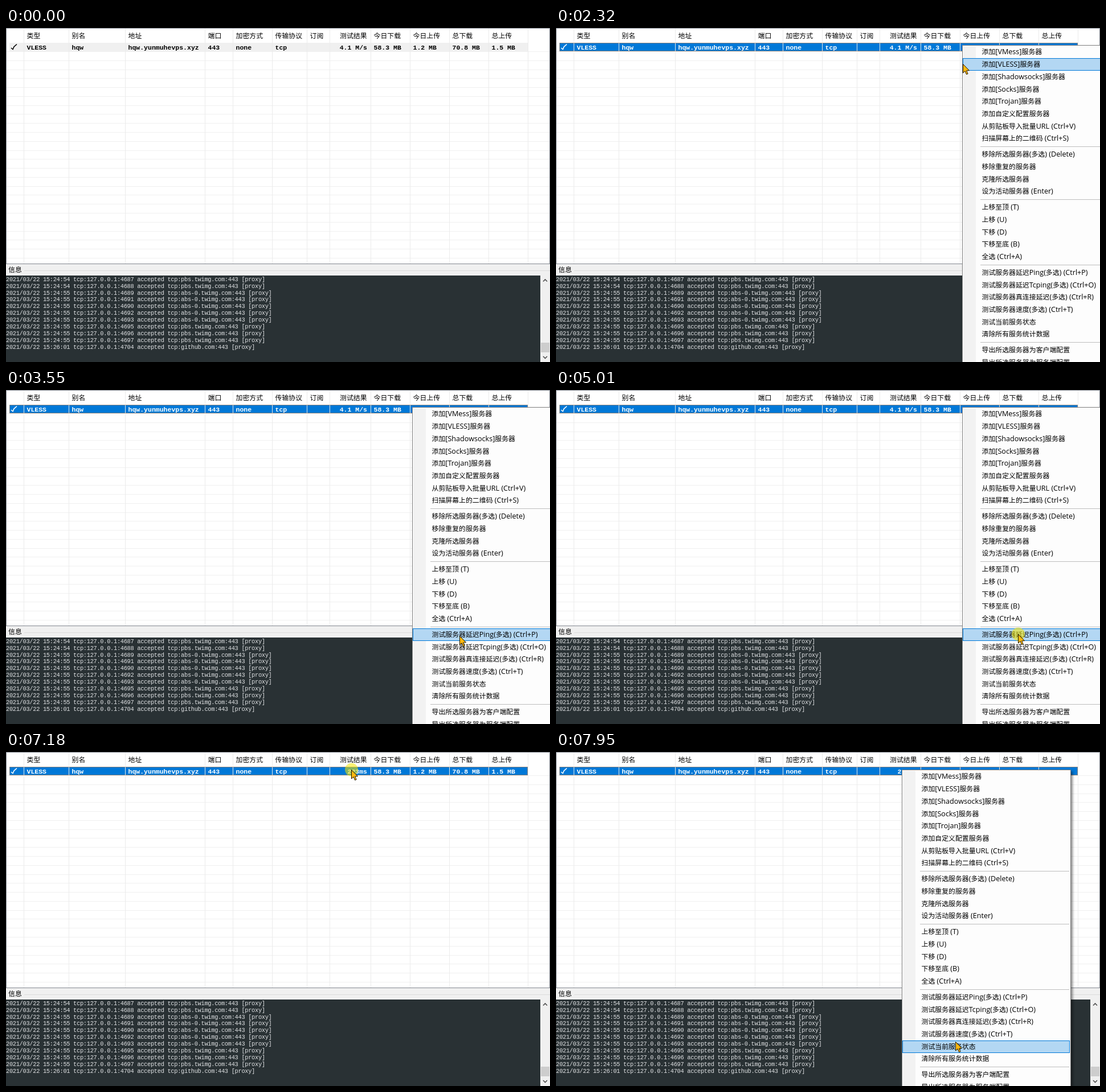
Animation, 955 px wide and 587 px high, one loop 8000 ms. Source, as an HTML page with a canvas:

```html
<!DOCTYPE html>
<html lang="zh">
<head>
<meta charset="utf-8">
<style>
html, body { margin: 0; width: 100%; height: 100%; overflow: hidden; background: #fff; }
canvas { display: block; }
</style>
</head>
<body>
<canvas id="stage" width="955" height="587"></canvas>
<script>
const g = document.getElementById('stage').getContext('2d');
const LOOP = 8000, STEP = 77, BLUE = '#0078d7';
const CJK = '11.9px "Noto Sans CJK SC", "Noto Sans CJK", sans-serif';
const LATIN = '12.6px "Open Sans", sans-serif';
const BOLD = 'bold 11.5px "Liberation Mono", monospace';
const LOG = '10.4px "Liberation Mono", monospace';

// left edge, heading, value
const columns = [[31, '类型', 'VLESS'], [110, '别名', 'hqw'], [209, '地址', 'hqw.yunmuhevps.xyz'],
  [349, '端口', '443'], [398, '加密方式', 'none'], [467, '传输协议', 'tcp'], [528, '订阅', ''],
  [568, '测试结果', ''], [640, '今日下载', '58.3 MB'], [709, '今日上传', '1.2 MB'],
  [778, '总下载', '70.8 MB'], [847, '总上传', '1.5 MB'], [916, '', '']];

const logs = ['24:54 4687 pbs', '24:54 4688 pbs', '24:55 4689 abs-0', '24:55 4691 abs-0',
  '24:55 4690 abs-0', '24:55 4692 abs-0', '24:55 4693 abs-0', '24:55 4695 pbs',
  '24:55 4696 pbs', '24:55 4697 pbs', '26:01 4704 github'].map(s => {
  const [time, port, host] = s.split(' ');
  const site = host === 'github' ? 'github.com' : host + '.twimg.com';
  return `2021/03/22 15:${time} tcp:127.0.0.1:${port} accepted tcp:${site}:443 [proxy]`;
});

// '-' is a separator
const items = ['添加[VMess]服务器', '添加[VLESS]服务器', '添加[Shadowsocks]服务器', '添加[Socks]服务器',
  '添加[Trojan]服务器', '添加自定义配置服务器', '从剪贴板导入批量URL (Ctrl+V)', '扫描屏幕上的二维码 (Ctrl+S)', '-',
  '移除所选服务器(多选) (Delete)', '移除重复的服务器', '克隆所选服务器', '设为活动服务器 (Enter)', '-',
  '上移至顶 (T)', '上移 (U)', '下移 (D)', '下移至底 (B)', '全选 (Ctrl+A)', '-',
  '测试服务器延迟Ping(多选) (Ctrl+P)', '测试服务器延迟Tcping(多选) (Ctrl+O)',
  '测试服务器真连接延迟(多选) (Ctrl+R)', '测试服务器速度(多选) (Ctrl+T)', '测试当前服务状态',
  '清除所有服务统计数据', '-', '导出所选服务器为客户端配置', '导出所选服务器为服务端配置'];

// pointer stops: first step, last step, x, y
const stops = [
  [0, 0, 890, 225], [760, 910, 794, 180],
  [1080, 1230, 714, 32], [1307, 1380, 700, 13], [1550, 1700, 712, 30],
  [2320, 2320, 714, 63], [2397, 3090, 795, 447],
  [3160, 3237, 795, 461], [3314, 3545, 796, 432], [3622, 3850, 814, 432],
  [4080, 4160, 813, 424], [4310, 4618, 808, 457], [4695, 5005, 811, 429],
  [5160, 5780, 688, 181], [5930, 6310, 604, 15],
  [6480, 6550, 607, 34], [6780, 6860, 606, 31], [7484, 7945, 701, 509]
];
const clicks = [[1930, 2005], [5005, 5160], [7180, 7330]];
const menus = [[2005, 5160, 713, 30], [7330, LOOP, 607, 31]];

function rect(color, x, y, w, h) {
  g.fillStyle = color;
  g.fillRect(x, y, w, h);
}

function text(s, x, y, font, color, spacing = '0px') {
  g.font = font;
  g.letterSpacing = spacing;
  g.fillStyle = color;
  g.fillText(s, x, y);
}

// Chinese and Latin runs use different faces
function mixed(s, x, y) {
  for (const run of s.split(/([\u4e00-\u9fff]+)/)) {
    text(run, x, y, /[\u4e00-\u9fff]/.test(run) ? CJK : LATIN, '#000');
    x += g.measureText(run).width;
  }
}

function line(color, width, ...p) {
  g.strokeStyle = color;
  g.lineWidth = width;
  g.beginPath();
  for (let i = 0; i < p.length; i += 2) g.lineTo(p[i], p[i + 1]);
  g.stroke();
}

// moves in even steps from stop to stop
function pointer(t) {
  const i = stops.findLastIndex(s => s[0] <= t);
  if (i < 1) return null;
  const [start, end, x, y] = stops[i], [, , x0, y0] = stops[i - 1];
  const n = Math.round((end - start) / STEP) + 1;
  const u = Math.min(1, (Math.floor((t - start) / STEP + 0.1) + 1) / n);
  return { x: x0 + (x - x0) * u, y: y0 + (y - y0) * u };
}

function table(t, hot) {
  const selected = t >= 1930, ink = selected ? '#fff' : '#000';
  rect('#fff', 0, 0, 955, 415);
  if (hot) {
    const i = columns.findLastIndex(c => c[0] <= hot.x);
    rect('#d9ebf9', columns[i][0] + 1, 2, columns[i + 1][0] - columns[i][0] - 1, 24);
  }
  rect(selected ? BLUE : '#f0f0f0', 6, 26, 910, 15);
  for (let i = 0; i < 24; i++) rect('#f0f0f0', 1, Math.round(41 + i * 15.78), 953, 1);
  g.lineWidth = 1;
  for (const [x, head, value] of columns) {
    rect('#ebebeb', x, 1, 1, 413);
    text(head, head === '测试结果' ? 586 : x + 5.5, 18.4, CJK, '#000');
    text(value, x + 5.5, 37.6, BOLD, ink);
  }
  if (selected) {
    // dotted focus frame
    g.setLineDash([1, 1]);
    g.strokeStyle = '#ff8728';
    g.strokeRect(6.5, 26.5, 909, 14);
    g.setLineDash([]);
  }
  line(ink, 1.6, 9, 35, 12, 37.5, 14, 33, 19, 28.5);
  g.textAlign = 'right';
  text(t < 5470 ? '4.1 M/s' : '223ms', 634, 37.6, BOLD, ink);
  g.textAlign = 'left';
  g.strokeStyle = '#828790';
  g.lineWidth = 1;
  g.strokeRect(0.5, 0.5, 954, 414);
}

function logPane() {
  rect('#f0f0f0', 0, 415, 955, 172);
  rect('#dcdcdc', 32, 426, 923, 1);
  text('信息', 4, 428.6, CJK, '#000');
  rect('#293134', 0, 435, 938, 152);
  logs.forEach((s, i) => text(s, 0, 444.8 + i * 11.87, LOG, '#e0e2e4', '-0.33px'));
  rect('#cdcdcd', 939, 553, 15, 17);
  line('#505050', 1.6, 943, 445.5, 946.5, 442, 950, 445.5);
  line('#505050', 1.6, 943, 577, 946.5, 580.5, 950, 577);
}

function menu(x, y, p) {
  g.save();
  g.shadowColor = 'rgba(0,0,0,.45)';
  g.shadowBlur = 4;
  g.shadowOffsetX = g.shadowOffsetY = 3;
  rect('#808080', x, y, 297, 600);
  g.restore();
  rect('#fdfdfd', x + 1, y + 1, 295, 600);
  rect('#f2f2f2', x + 2, y + 2, 22, 600);
  let top = y + 1.5;
  for (const s of items) {
    if (s === '-') {
      rect('#bdbdbd', x + 32, Math.round(top + 3), 262, 1);
      top += 6.2;
      continue;
    }
    if (p.x >= x - 1 && p.y >= top && p.y < top + 21.7) {
      const h = Math.round(top);
      rect(BLUE, x + 1, h, 294, 22);
      rect('#b3d7f3', x + 2, h + 1, 292, 20);
    }
    mixed(s, x + 34.5, top + 14.9);
    top += 21.7;
  }
}

function arrow({ x, y }) {
  g.save();
  g.translate(x + 0.5, y + 0.5);
  g.fillStyle = '#ffb90f';
  g.strokeStyle = '#1a1400';
  g.lineWidth = 1;
  const shape = new Path2D('M0 0V15.5L3.6 12.2 6 18 8.6 17 6.2 11.4 11 11.2Z');
  g.fill(shape);
  g.stroke(shape);
  g.restore();
}

function draw(t) {
  const p = pointer(t);
  const during = ([a, b]) => t >= a && t < b;
  const open = menus.find(during);
  table(t, !open && p && p.y < 26 ? p : null);
  logPane();
  if (open) {
    // brief fade-in
    g.globalAlpha = t - open[0] < 75 ? 0.5 : 1;
    menu(open[2], open[3], p);
    g.globalAlpha = 1;
  }
  if (!p) return;
  if (clicks.some(during)) {
    g.fillStyle = 'rgba(245,230,0,.55)';
    g.beginPath();
    g.arc(p.x + 0.5, p.y, 11.5, 0, 7);
    g.fill();
  }
  arrow(p);
}

const began = performance.now();
function tick() {
  draw((performance.now() - began) % LOOP);
  requestAnimationFrame(tick);
}
tick();
</script>
</body>
</html>
```
